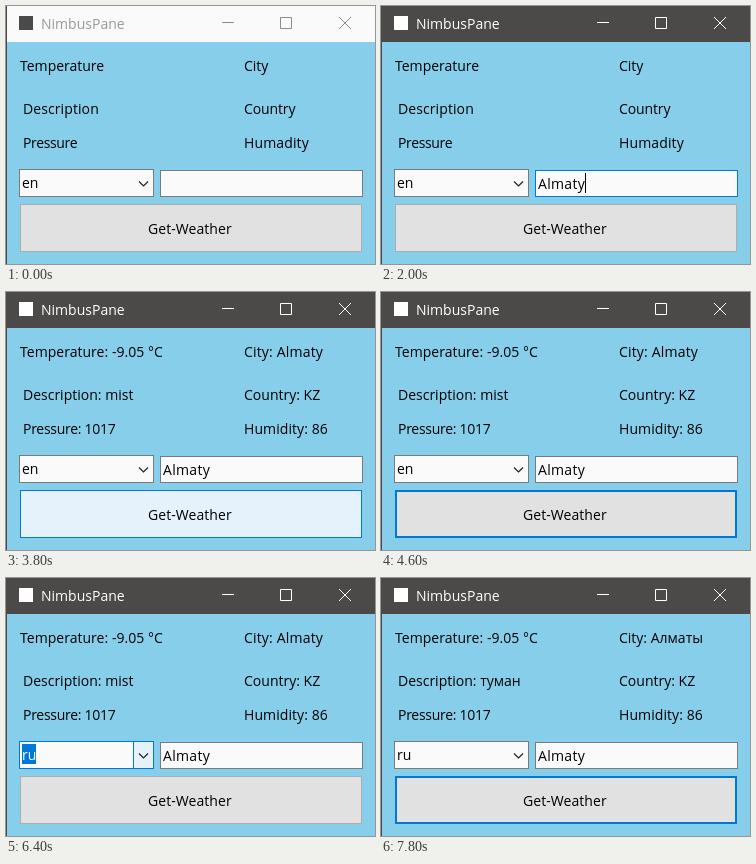
Recreate the animation shown at these times as an HTML page. Size 369x258 px, loop 8 s.

```html
<!DOCTYPE html>
<html lang="en">
<head>
<meta charset="utf-8">
<title>NimbusPane</title>
<style>
html, body { margin: 0; width: 100%; height: 100%; overflow: hidden; background: #87ceeb; }
svg { display: block; width: 100vw; height: 100vh; }
text { font: 14px "Open Sans", "Noto Sans", sans-serif; white-space: pre; }
rect { shape-rendering: crispEdges; }

/* every animated part shares one 8 s clock; a few ms early so steps land on time */
[class] { animation: 8s step-end -10ms infinite; }

/* title bar */
.bar { animation-name: bar; }
.title { animation-name: title; }
.icon { animation-name: icon; }
.ctl { fill: none; animation-name: ctl; }
@keyframes bar { 0% { fill: #fafafa } 1.25%, 100% { fill: #4c4a48 } }
@keyframes title { 0% { fill: #999 } 1.25%, 100% { fill: #fff } }
@keyframes icon { 0% { fill: #4a4a4a } 1.25%, 100% { fill: #fff } }
@keyframes ctl { 0% { stroke: #8c8c8c } 1.25%, 100% { stroke: #fff } }

/* labels */
.empty { animation-name: empty; }
.filled { animation-name: filled; }
.english { animation-name: english; }
.russian { animation-name: russian; }
@keyframes empty { 0% { opacity: 1 } 47.5%, 100% { opacity: 0 } }
@keyframes filled { 0% { opacity: 0 } 47.5%, 100% { opacity: 1 } }
@keyframes english { 0% { opacity: 0 } 47.5% { opacity: 1 } 90%, 100% { opacity: 0 } }
@keyframes russian { 0% { opacity: 0 } 90%, 100% { opacity: 1 } }

/* text box */
.field { animation-name: field; }
.typing { animation-name: typing; }
.caret { animation-name: caret; }
@keyframes field {
  0% { stroke: #7a7a7a }
  1.25% { stroke: #3d79a8; animation-timing-function: linear }
  3.75% { stroke: #0078d7 }
  41.25% { stroke: #0078d7; animation-timing-function: linear }
  43.75%, 100% { stroke: #7a7a7a }
}
@keyframes typing {
  0% { transform: translateX(157px) }
  8.75% { transform: translateX(167px) }
  17.5% { transform: translateX(171px) }
  20% { transform: translateX(184px) }
  22.5% { transform: translateX(192px) }
  23.75% { transform: translateX(197px) }
  25%, 100% { transform: translateX(204px) }
}
@keyframes caret {
  0% { opacity: 0 }
  2.5% { opacity: 1 }
  15% { opacity: 0 }
  17.5% { opacity: 1 }
  31.25%, 100% { opacity: 0 }
}

/* button */
.button { animation-name: face, edge; }
.ring { animation-name: ring; }
@keyframes face {
  0% { fill: #e1e1e1 }
  36.25% { fill: #e5f1fb }
  40% { fill: #cce4f7 }
  41.25% { fill: #cce4f7; animation-timing-function: linear }
  43.75% { fill: #e5f1fb }
  57.5% { fill: #e1e1e1 }
  82.5% { fill: #e5f1fb }
  86.25% { fill: #cce4f7 }
  88.75% { fill: #cce4f7; animation-timing-function: linear }
  91.25% { fill: #e5f1fb }
  97.5%, 100% { fill: #e1e1e1 }
}
@keyframes edge {
  0% { stroke: #adadad }
  36.25% { stroke: #0078d7 }
  40% { stroke: #005499 }
  41.25% { stroke: #005499; animation-timing-function: linear }
  43.75% { stroke: #0078d7 }
  67.5% { stroke: #adadad }
  82.5% { stroke: #0078d7 }
  86.25% { stroke: #005499 }
  88.75% { stroke: #005499; animation-timing-function: linear }
  91.25%, 100% { stroke: #0078d7 }
}
@keyframes ring {
  0% { opacity: 0 }
  57.5% { opacity: 1 }
  67.5% { opacity: 0 }
  97.5%, 100% { opacity: 1 }
}

/* combo box */
.combo { animation-name: combo; }
.arrow { animation-name: arrow; }
.pick-en { animation-name: pick-en; }
.pick-ru { animation-name: pick-ru; }
.mark-en { animation-name: mark-en; }
.mark-ru { animation-name: mark-ru; }
.combo-caret { animation-name: combo-caret; }
@keyframes combo {
  0% { stroke: #7a7a7a }
  58.75% { stroke: #171717 }
  67.5% { stroke: #0078d7 }
  88.75% { stroke: #0078d7; animation-timing-function: linear }
  91.25%, 100% { stroke: #7a7a7a }
}
@keyframes arrow {
  0% { fill: #e5f1fb; stroke: #0078d7; opacity: 0 }
  60% { fill: #e5f1fb; stroke: #0078d7; opacity: 1 }
  67.5% { fill: #cce4f7; stroke: #005499; opacity: 1 }
  80% { fill: #e5f1fb; stroke: #0078d7; opacity: 1 }
  81.25%, 100% { fill: #e5f1fb; stroke: #0078d7; opacity: 0 }
}
@keyframes pick-en { 0% { fill: #000 } 67.5% { fill: #fff } 80%, 100% { fill: transparent } }
@keyframes pick-ru { 0% { fill: transparent } 80% { fill: #fff } 86.25%, 100% { fill: #000 } }
@keyframes mark-en { 0% { opacity: 0 } 67.5% { opacity: 1 } 80%, 100% { opacity: 0 } }
@keyframes mark-ru { 0% { opacity: 0 } 80% { opacity: 1 } 86.25%, 100% { opacity: 0 } }
@keyframes combo-caret { 0% { opacity: 0 } 67.5% { opacity: 1 } 76.25%, 100% { opacity: 0 } }

/* drop-down list */
.list { animation-name: list; }
.hot { animation-name: hot; }
.item-en { animation-name: item-en; }
.item-ru { animation-name: item-ru; }
@keyframes list { 0% { opacity: 0 } 68.75% { opacity: 1 } 80%, 100% { opacity: 0 } }
@keyframes hot { 0% { transform: none } 73.75%, 100% { transform: translateY(20px) } }
@keyframes item-en { 0% { fill: #fff } 73.75%, 100% { fill: #000 } }
@keyframes item-ru { 0% { fill: #000 } 73.75%, 100% { fill: #fff } }
</style>
</head>
<body>
<svg viewBox="0 0 369 258">
  <defs>
    <linearGradient id="shade">
      <stop stop-opacity=".5"/>
      <stop offset="1" stop-opacity="0"/>
    </linearGradient>
  </defs>

  <rect width="369" height="258" fill="#87ceeb"/>
  <rect class="bar" width="369" height="36"/>
  <rect width="1" height="258" fill="#4c4a48"/>
  <rect class="icon" x="13" y="10" width="14" height="14"/>
  <text class="title" x="35" y="23">NimbusPane</text>
  <path class="ctl" d="M216 16.5h12M274.5 11.5h11v11h-11zM333 11l12 12M345 11l-12 12"/>

  <g class="empty">
    <text x="14" y="65">Temperature</text>
    <text x="238" y="65">City</text>
    <text x="17" y="108" letter-spacing=".1">Description</text>
    <text x="238" y="108" letter-spacing="-.12">Country</text>
    <text x="17" y="142" letter-spacing="-.35">Pressure</text>
    <text x="238" y="142" letter-spacing=".12">Humadity</text>
  </g>
  <g class="filled">
    <text x="14" y="65" letter-spacing=".03">Temperature: -9.05 °C</text>
    <text x="238" y="108">Country: KZ</text>
    <text x="17" y="142" letter-spacing="-.28">Pressure: 1017</text>
    <text x="238" y="142" letter-spacing=".08">Humidity: 86</text>
  </g>
  <g class="english">
    <text x="238" y="65" letter-spacing=".17">City: Almaty</text>
    <text x="17" y="108">Description: mist</text>
  </g>
  <g class="russian">
    <text x="238" y="65">City: Алматы</text>
    <text x="17" y="108">Description: туман</text>
  </g>

  <rect class="field" x="154.5" y="164.5" width="202" height="26" fill="#fafafa"/>
  <text x="157" y="183" letter-spacing=".3">Almaty</text>
  <g class="typing">
    <rect width="50" height="22" y="166" fill="#fafafa"/>
    <rect class="caret" width="1" height="20" y="167"/>
  </g>

  <rect class="button" x="14.5" y="198.5" width="341" height="47"/>
  <rect class="ring" x="15.5" y="199.5" width="339" height="45" fill="none" stroke="#0078d7"/>
  <text x="142" y="228" letter-spacing=".07">Get-Weather</text>

  <rect class="combo" x="13.5" y="163.5" width="134" height="27" fill="#fafafa"/>
  <rect class="mark-en" x="16" y="166" width="16" height="20" fill="#0078d7"/>
  <rect class="mark-ru" x="16" y="166" width="14" height="20" fill="#0078d7"/>
  <rect class="combo-caret" x="32" y="166" width="1" height="20" fill="#ff8728"/>
  <text class="pick-en" x="16" y="182">en</text>
  <text class="pick-ru" x="16" y="182">ru</text>
  <rect class="arrow" x="127.5" y="163.5" width="20" height="27"/>
  <path d="M133 175.5l4.5 4.5 4.5-4.5" fill="none" stroke="#222" stroke-width="1.2"/>

  <g class="list">
    <rect x="148" y="196" width="4" height="62" fill="url(#shade)"/>
    <rect x="13.5" y="191.5" width="134" height="80" fill="#fff" stroke="#0078d7"/>
    <rect class="hot" x="14" y="192" width="133" height="20" fill="#0078d7"/>
    <text class="item-en" x="16" y="208">en</text>
    <text class="item-ru" x="16" y="228">ru</text>
    <text x="16" y="248">fr</text>
  </g>
</svg>
</body>
</html>
```
